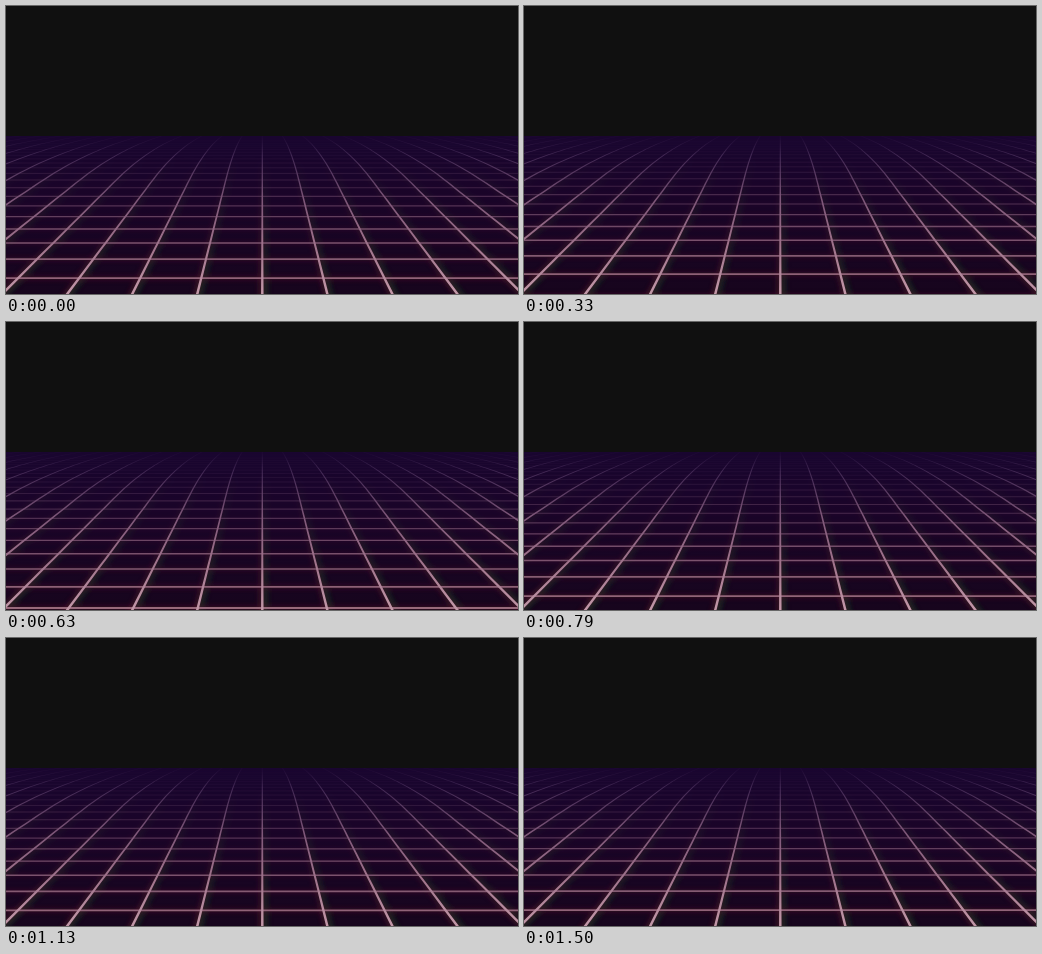
These frames come from a looping animation (512 by 288 pixels, 1.54 s). An HTML page:

```html
<!DOCTYPE html>
<html lang="en">
<head>
<meta charset="utf-8">
<title>Neon grid</title>
<style>
  html, body { margin: 0; width: 100%; height: 100%; overflow: hidden; background: #101010; }
  svg { display: block; width: 100vw; height: 100vh; }
</style>
</head>
<body>
<svg viewBox="0 0 512 288" preserveAspectRatio="none">
  <defs>
    <linearGradient id="floor" gradientUnits="userSpaceOnUse" x1="0" y1="130" x2="0" y2="288">
      <stop offset="0" stop-color="#19052f"/>
      <stop offset=".45" stop-color="#190528"/>
      <stop offset="1" stop-color="#17051d"/>
    </linearGradient>
    <linearGradient id="beam" gradientUnits="userSpaceOnUse" x1="0" y1="131" x2="0" y2="288">
      <stop offset="0" stop-color="#4a3060" stop-opacity=".1"/>
      <stop offset=".12" stop-color="#573a68" stop-opacity=".65"/>
      <stop offset=".4" stop-color="#7d5678"/>
      <stop offset=".7" stop-color="#a0748c"/>
      <stop offset="1" stop-color="#c298a8"/>
    </linearGradient>
    <linearGradient id="fade" gradientUnits="userSpaceOnUse" x1="0" y1="150" x2="0" y2="288">
      <stop offset="0" stop-color="#fff" stop-opacity="0"/>
      <stop offset="1" stop-color="#fff"/>
    </linearGradient>
    <mask id="near" maskUnits="userSpaceOnUse" x="0" y="130" width="512" height="158">
      <rect y="130" width="512" height="158" fill="url(#fade)"/>
    </mask>
    <filter id="blur" filterUnits="userSpaceOnUse" x="-20" y="120" width="552" height="190">
      <feGaussianBlur stdDeviation="2.2"/>
    </filter>
    <filter id="soft" filterUnits="userSpaceOnUse" x="-20" y="120" width="552" height="190">
      <feGaussianBlur stdDeviation=".4"/>
    </filter>
    <clipPath id="ground"><rect y="130" width="512" height="158"/></clipPath>
  </defs>
  <rect width="512" height="288" fill="#101010"/>
  <g clip-path="url(#ground)">
    <rect y="130" width="512" height="158" fill="url(#floor)"/>
    <g mask="url(#near)">
      <g filter="url(#blur)">
        <path id="green" fill="#1d4024" fill-opacity=".45"/>
        <path id="red" fill="#6a1630" fill-opacity=".35"/>
        <g id="glow" stroke="#6a1630" stroke-opacity=".35"/>
      </g>
    </g>
    <g filter="url(#soft)">
      <g id="rows"/>
      <path id="rails" fill="url(#beam)"/>
    </g>
  </g>
</svg>
<script>
const LOOP = 1540, FRAME = 1000 / 24, LAST = 36;
const MID = 256.3, FAR = 37, SIDE = 12;
const $ = id => document.getElementById(id);
const mix = (a, b, u) => a + (b - a) * u;
const clamp = u => Math.max(0, Math.min(1, u));

// [step, rows travelled]
const travel = [[0, 0], [8, .81], [15, 1.64], [19, 2.1], [24, 2.65], [31, 3.49], [36, 4]];

// Screen height at depth z; the ground bends away near the horizon.
function groundY(z) {
  const y = 28 + 2907 / z, bend = Math.max(0, 176 - y) / 60;
  return y + 17 * bend * bend;
}
const gap = z => 727 / z;
const nearness = y => clamp((y - 131) / 157);

function railPath(extra, shift) {
  let d = "";
  for (let k = -SIDE; k <= SIDE; k++) {
    const left = [], right = [];
    for (let z = 10.5; z <= FAR; z += .5) {
      const y = groundY(z), x = MID + shift + k * gap(z);
      const half = (mix(.45, 1.25, nearness(y)) + extra) * Math.hypot(1, k * .25);
      left.push((x - half).toFixed(2) + " " + y.toFixed(2));
      right.unshift((x + half).toFixed(2) + " " + y.toFixed(2));
    }
    d += "M" + left.concat(right).join("L") + "Z";
  }
  return d;
}

function addRow(group) {
  const line = document.createElementNS("http://www.w3.org/2000/svg", "line");
  line.setAttribute("x1", -10);
  line.setAttribute("x2", 522);
  return group.appendChild(line);
}

$("rails").setAttribute("d", railPath(0, 0));
$("green").setAttribute("d", railPath(2.5, 2.5));
$("red").setAttribute("d", railPath(1.5, -1.5));
const rows = [], glows = [];
for (let z = 10; z < FAR; z++) {
  rows.push(addRow($("rows")));
  glows.push(addRow($("glow")));
}

function place(line, y, width) {
  line.setAttribute("y1", y);
  line.setAttribute("y2", y);
  line.setAttribute("stroke-width", width);
}

function distance(step) {
  const i = Math.max(1, travel.findIndex(p => p[0] >= step));
  const [a, from] = travel[i - 1], [b, to] = travel[i];
  return mix(from, to, (step - a) / (b - a));
}

function draw(ms) {
  const step = Math.min(LAST, Math.floor((ms % LOOP + 5) / FRAME));
  const phase = ((.91 - distance(step)) % 1 + 1) % 1;
  rows.forEach((row, i) => {
    const y = groundY(10 + i + phase), u = nearness(y);
    const rgb = [mix(62, 160, u), mix(36, 112, u), mix(78, 130, u)].map(Math.round);
    place(row, y, mix(.7, 1.9, u));
    row.setAttribute("stroke", `rgb(${rgb})`);
    row.setAttribute("stroke-opacity", mix(.05, .95, clamp(u * 1.7)));
    place(glows[i], y, mix(1, 5, u));
  });
}

const start = performance.now();
function tick() {
  draw(performance.now() - start);
  requestAnimationFrame(tick);
}
tick();
</script>
</body>
</html>
```
